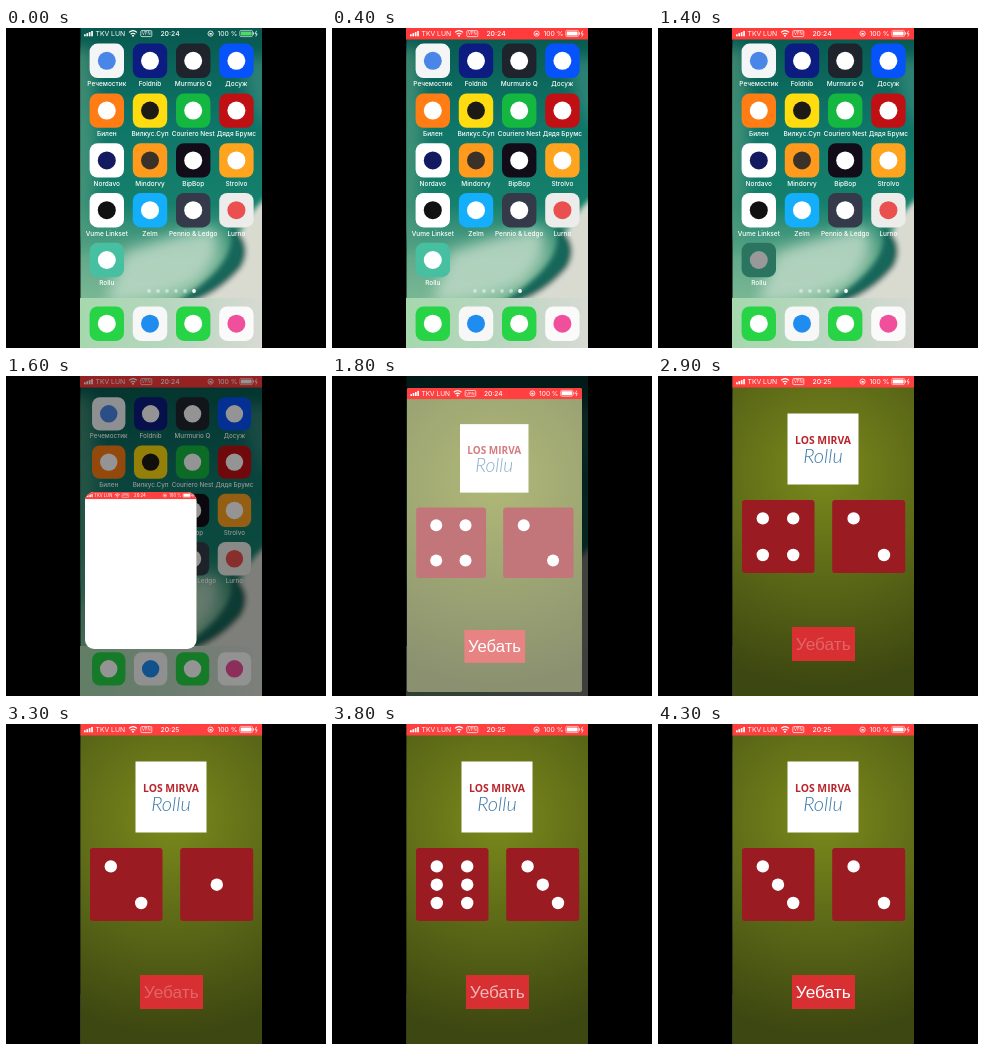
Animation, 320 px wide and 320 px high, one loop 4.7 s. Source, as an HTML page:

```html
<!DOCTYPE html>
<html lang="ru">
<head>
<meta charset="utf-8">
<title>Dice app</title>
<style>
html, body { margin: 0; width: 100%; height: 100%; overflow: hidden; background: #000; }
svg { display: block; width: 100%; height: 100%; }
text { font-family: Inter, Roboto, sans-serif; fill: #fff; }
.label { font-size: 6.5px; font-weight: 500; text-anchor: middle; }
.status { font-size: 6.8px; }
</style>
</head>
<body>
<svg id="stage" viewBox="0 0 320 320">
  <defs>
    <clipPath id="phone"><rect x="74.5" width="181.5" height="320"/></clipPath>
    <clipPath id="window"><rect id="windowRect" x="74.5"/></clipPath>
    <linearGradient id="sea" x1="0" y1="0" x2="0" y2="1">
      <stop offset="0" stop-color="#08584f"/>
      <stop offset=".3" stop-color="#0f7568"/>
      <stop offset=".55" stop-color="#15806c"/>
      <stop offset=".72" stop-color="#63a98a"/>
      <stop offset="1" stop-color="#93c9a0"/>
    </linearGradient>
    <linearGradient id="dockFill">
      <stop offset="0" stop-color="#a5d8ad"/>
      <stop offset=".5" stop-color="#b9d6c0"/>
      <stop offset="1" stop-color="#d8dad3"/>
    </linearGradient>
    <radialGradient id="felt" gradientUnits="userSpaceOnUse" cx="165" cy="95" r="215">
      <stop offset="0" stop-color="#7b8a1c"/>
      <stop offset=".4" stop-color="#626f18"/>
      <stop offset="1" stop-color="#3d4711"/>
    </radialGradient>
    <filter id="soft" x="-40%" y="-40%" width="180%" height="180%"><feGaussianBlur stdDeviation="7"/></filter>
    <filter id="mist" x="-30%" y="-30%" width="160%" height="160%"><feGaussianBlur stdDeviation="2.5"/></filter>
  </defs>
  <rect width="320" height="320"/>
  <g clip-path="url(#phone)">
    <g id="home">
      <rect x="74" width="183" height="320" fill="url(#sea)"/>
      <g filter="url(#soft)">
        <path d="M60 20H86Q95 130 84 210H60Z" fill="#5a9f80" opacity=".6"/>
        <path d="M235 30H270V100Q245 95 235 30Z" fill="#4c9c8c" opacity=".5"/>
        <path d="M118 225Q170 205 208 200Q222 225 190 255Q150 275 100 275Z" fill="#bcd9c6" opacity=".85"/>
      </g>
      <g filter="url(#mist)">
        <path d="M262 168Q236 190 232 215Q215 250 165 278H262Z" fill="#d9dbd1"/>
        <path d="M222 195Q240 235 160 280Q205 275 235 240Q250 215 222 195Z" fill="#14665a"/>
      </g>
      <rect x="74" y="270" width="183" height="50" fill="url(#dockFill)"/>
      <g id="icons"></g>
      <g id="homeTop">
        <rect id="homeBar" x="74" width="183" height="11.5" fill="#ff3b3b"/>
        <g id="homeStatus"></g>
      </g>
    </g>
    <rect id="dim" x="74" width="183" height="320"/>
    <g id="app">
      <g clip-path="url(#window)">
        <rect x="74" width="183" height="320" fill="url(#felt)"/>
        <rect x="129.5" y="37.5" width="71" height="71" fill="#fff"/>
        <text x="165" y="68" font-size="10.4" text-anchor="middle" style="font-family:'Open Sans',sans-serif;font-weight:700;fill:#b8252b">LOS MIRVA</text>
        <text x="165" y="87" font-size="20" text-anchor="middle" style="font-family:Lato,sans-serif;font-style:italic;font-weight:300;fill:#3b78a8">Rollu</text>
        <rect x="84" y="124" width="72.5" height="73" rx="3" fill="#9b1b22"/>
        <rect x="174.2" y="124" width="73" height="73" rx="3" fill="#9b1b22"/>
        <g id="pips" fill="#fff"></g>
        <rect x="134" y="251" width="63" height="34" fill="#d83032"/>
        <text id="roll" x="165.3" y="274" font-size="17.3" text-anchor="middle" style="font-family:'Liberation Sans',Arial,sans-serif">Уебать</text>
        <rect id="wash" x="74" width="183" height="320" fill="#fff"/>
        <rect x="74" width="183" height="11.5" fill="#ff3f40"/>
        <g id="appStatus"></g>
      </g>
    </g>
  </g>
</svg>
<script>
const LOOP = 4700, STEP = 100;
const $ = id => document.getElementById(id);
const set = (id, attrs) => {
  for (const k in attrs) $(id).setAttribute(k, attrs[k]);
};

// label, tile colour, badge colour
const apps = [
  ['Речемостик', '#f3f5f7', '#4a86e8'], ['Foldnib', '#0c1c80', '#fff'],
  ['Murmurio Q', '#1f242c', '#fff'], ['Досуж', '#0652fb', '#fff'],
  ['Билен', '#ff7d14', '#fff'], ['Вилкус.Суп', '#ffdc10', '#1c1a14'],
  ['Couriero Nest', '#14b840', '#fff'], ['Дядя Брумс', '#c01014', '#fff'],
  ['Nordavo', '#fff', '#131a60'], ['Mindorvy', '#ff9a1c', '#3a3128'],
  ['BipBop', '#110c18', '#fff'], ['Strolvo', '#ffa41f', '#fff'],
  ['Vume Linkset', '#fff', '#111'], ['Zelm', '#14aefb', '#fff'],
  ['Pennio & Ledgo', '#343a4a', '#fff'], ['Lurno', '#ececea', '#e9504f'],
  ['Rollu', '#46c0a0', '#fff']
];
const dock = [['#26d445', '#fff'], ['#f7f7f7', '#1f8df0'], ['#26d445', '#fff'], ['#fafafa', '#ef4f9b']];

function tile(x, y, color, badge) {
  return `<rect x="${x}" y="${y}" width="34.4" height="34.4" rx="8" fill="${color}"/>
    <circle cx="${x + 17.2}" cy="${y + 17.2}" r="9" fill="${badge}"/>`;
}

function drawIcons() {
  let out = '';
  apps.forEach(([name, color, badge], i) => {
    const x = 83.6 + (i % 4) * 43.2, y = 15.6 + Math.floor(i / 4) * 49.8;
    out += tile(x, y, color, badge) +
      `<text class="label" x="${x + 17.2}" y="${y + 42.6}">${name.replace('&', '&amp;')}</text>`;
  });
  dock.forEach(([color, badge], i) => out += tile(83.6 + i * 43.2, 278.5, color, badge));
  for (let i = 0; i < 6; i++)
    out += `<circle cx="${143 + i * 9}" cy="263" r="1.9" fill="#fff" opacity="${i === 5 ? 1 : .45}"/>`;
  out += '<rect id="press" x="83.6" y="214.8" width="34.4" height="34.4" rx="8" opacity="0"/>';
  $('icons').innerHTML = out;
}

function drawStatus(id) {
  let out = '';
  for (let i = 0; i < 4; i++)
    out += `<rect x="${78 + i * 2.4}" y="${6.3 - i * 1.1}" width="1.7" height="${2 + i * 1.1}" fill="#fff"/>`;
  out += `<text class="status" x="89.5" y="8.2">TKV LUN</text>
    <g fill="none" stroke="#fff">
      <path d="M123 4.4Q127 1 131 4.4M124.7 6.2Q127 4.3 129.3 6.2" stroke-width="1.2"/>
      <rect x="134.8" y="2.6" width="11" height="6" rx="1" stroke-width=".7"/>
      <circle cx="204.6" cy="5.6" r="2.6" stroke-width=".8"/>
      <rect x="233.8" y="2.4" width="12.8" height="6.2" rx="1.3" stroke-width=".6"/>
    </g>
    <circle cx="127" cy="7.8" r="1" fill="#fff"/>
    <rect x="203.5" y="4.9" width="2.2" height="1.8" fill="#fff"/>
    <text x="140.3" y="7.2" font-size="4.2" text-anchor="middle">VPN</text>
    <text class="status clock" x="164" y="8.3" text-anchor="middle" font-weight="500"></text>
    <text class="status" x="211.5" y="8.3">100 %</text>
    <rect class="charge" x="234.8" y="3.4" width="10.8" height="4.2" rx=".6" fill="#fff"/>
    <path d="M247.5 4.3v2.4M250.6 2.8l-1.5 3h2l-1.3 2.7" stroke="#fff" stroke-width=".8" fill="none"/>`;
  $(id).innerHTML = out;
}

function face(n, cx) {
  const spots = [];
  const pair = (x, y) => spots.push([x, y], [-x, -y]);
  if (n % 2) spots.push([0, 0]);
  if (n > 1) pair(-15.2, -18.3);
  if (n > 3) pair(15.2, -18.3);
  if (n > 5) pair(15.2, 0);
  return spots.map(([x, y]) => `<circle cx="${cx + x}" cy="${160.7 + y}" r="6.2"/>`).join('');
}

// time, x, y, width, height, corner radius, white overlay
const opening = [
  [1600, 79, 116, 111.5, 157, 9, 1],
  [1700, 76, 45, 156, 255, 5, .8],
  [1800, 75, 12, 175, 304, 2, .4],
  [1900, 74.6, 4, 179.5, 315, 1, .2],
  [2000, 74.5, 1, 181, 319, 0, .07],
  [2100, 74.5, 0, 181.5, 320, 0, 0]
];
const presses = [2900, 3300, 3700, 4100];
const rolls = [[4, 2], [2, 1], [5, 4], [6, 3], [3, 2]];
const HOLD = 100;

function drawHome(t) {
  const red = Math.min(1, t / 400);
  const back = t >= 1600;
  set('homeBar', { opacity: red });
  set('homeTop', { opacity: t > 1600 ? 0 : 1 });
  $('homeStatus').querySelector('.charge').setAttribute('fill', red < .5 ? '#4cd964' : '#fff');
  set('press', { opacity: t >= 1400 && t < 1600 ? .4 : 0 });
  set('dim', { opacity: back ? Math.min(.75, .42 + (t - 1600) / 700) : 0 });
  const s = back ? .97 : 1;
  set('icons', { transform: `translate(165 200) scale(${s}) translate(-165 -200)` });
}

function drawApp(t) {
  const key = opening.filter(k => k[0] <= t).pop();
  $('app').style.display = key ? '' : 'none';
  if (!key) return;
  const [, x, y, w, h, r, white] = key, s = w / 181.5;
  set('app', { transform: `translate(${x} ${y}) scale(${s}) translate(-74.5 0)` });
  set('windowRect', { width: 181.5, height: h / s, rx: r / s });
  set('wash', { opacity: white });

  const done = presses.filter(p => t >= p + HOLD).length;
  const [a, b] = rolls[done];
  $('pips').innerHTML = face(a, 120) + face(b, 210.8);

  const last = presses.filter(p => t >= p).pop();
  const since = last === undefined ? Infinity : t - last;
  set('roll', { opacity: since < HOLD ? .25 : since < 2 * HOLD ? .65 : 1 });
}

function render(ms) {
  const t = Math.floor((ms % LOOP) / STEP) * STEP;
  drawHome(t);
  drawApp(t);
  const time = t >= 2200 ? '20:25' : '20:24';
  document.querySelectorAll('.clock').forEach(el => el.textContent = time);
}

drawIcons();
drawStatus('homeStatus');
drawStatus('appStatus');
const start = performance.now();
function tick() {
  render(performance.now() - start);
  requestAnimationFrame(tick);
}
tick();
</script>
</body>
</html>
```
